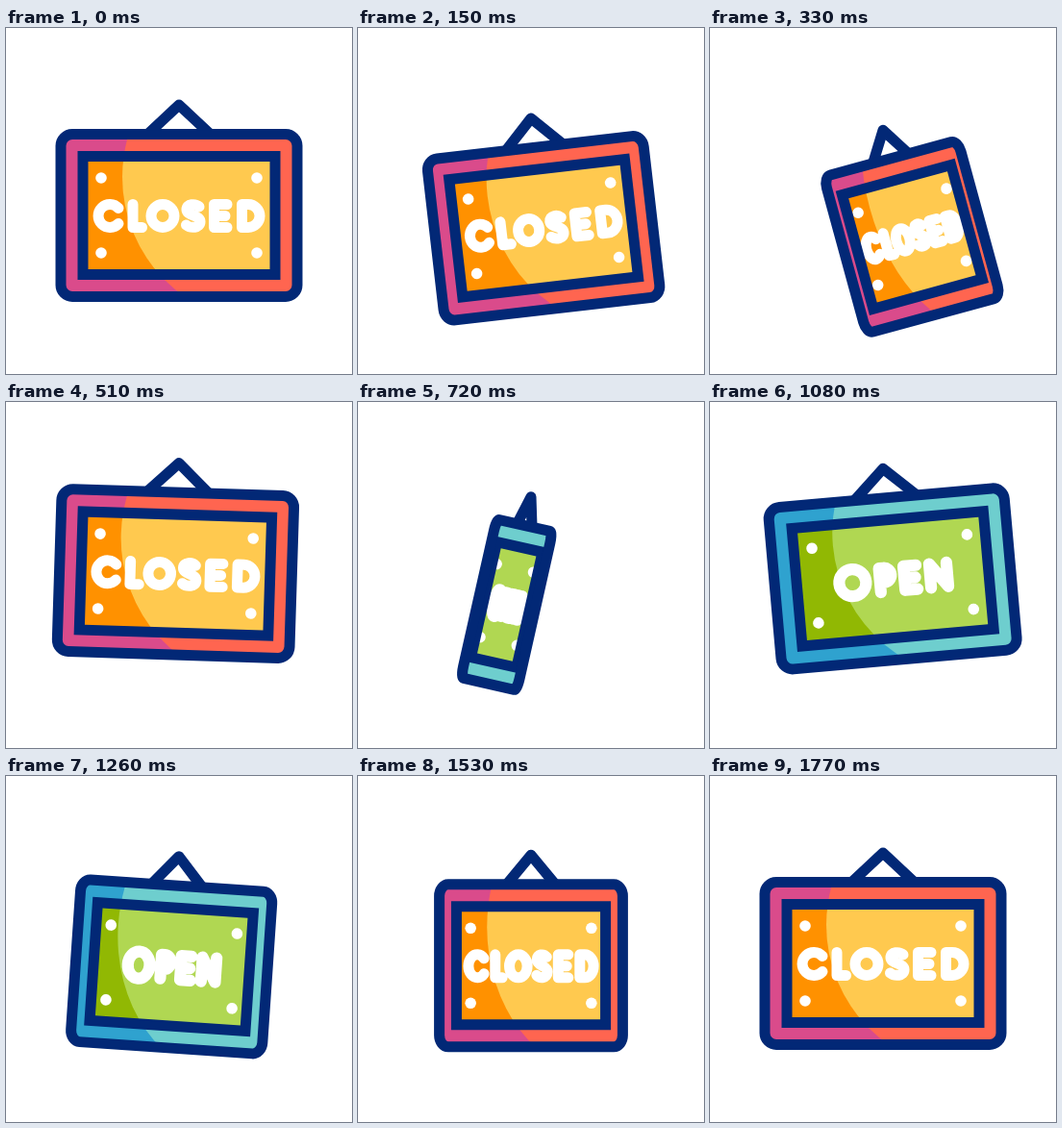
An HTML page with a canvas for the animation above (1.8 s loop, 360 by 360 pixels).

```html
<!DOCTYPE html>
<html lang="en">
<head>
<meta charset="utf-8">
<title>Closed / Open sign</title>
<style>
  html, body { margin: 0; width: 100%; height: 100%; overflow: hidden; background: #fff; }
  canvas { display: block; width: 360px; height: 360px; }
</style>
</head>
<body>
<canvas id="stage" role="img" aria-label="Hanging sign turning between CLOSED and OPEN"></canvas>
<script>
const LOOP = 1800, STEP = 30;
const PIVOT = { x: 180, y: 80 };
const NAVY = '#022876';

// Keys are [ms, value], joined with a sine ease.
const SWING = [[0, 0], [330, -15.3], [660, 14.6], [980, -8], [1285, 4.1], [1530, 0], [LOOP, 0]];
const DROP = [[0, 0], [300, 28], [555, -20], [800, 31], [1055, -11], [1340, 7], [1650, 0], [LOOP, 0]];
const TURN = [[0, 0], [330, -54], [965, 180], [1060, 180], [1740, 360], [LOOP, 360]];

const SIDES = {
  closed: {
    frame: ['#da4b8b', '#ff6550'],
    face: ['#ff9100', '#ffc94f'],
    weight: 11,
    slide: 0,
    letters: new Path2D(
      'M-63,-8A12,12 0 1 0 -63,8' +
      'M-48,-12V12H-38.5' +
      'M-29,0A12,12 0 1 1 -5,0A12,12 0 1 1 -29,0Z' +
      'M21,-9.5C17,-13 8,-13 8,-6.5C8,0 22,-1 22,6C22,13 12,13 7.5,9.5' +
      'M50,-12H36.5V12H50M36.5,0H48' +
      'M65.5,-12V12H72A12,12 0 0 0 72,-12Z')
  },
  open: {
    frame: ['#2fa2cf', '#6ecece'],
    face: ['#91b803', '#b0d752'],
    weight: 12.2,
    slide: 55,
    letters: new Path2D(
      'M-56,0A14,14 0 1 1 -28,0A14,14 0 1 1 -56,0Z' +
      'M-13.5,12.5V-12.5H-9A7.5,7.5 0 0 1 -9,2.5H-13.5' +
      'M25,-12.5H12V12.5H25M12,0H23.5' +
      'M39,12.5V-12.5L57,12.5V-12.5')
  }
};

const OUTLINE = new Path2D();
OUTLINE.roundRect(-123, 30.5, 246, 169, 12);
const FACE = new Path2D('M-100,53.5H100V176.5H-100Z');
const HOOK = new Path2D('M-31,29L0,0L31,29');
const LIGHT = new Path2D('M93,-77A152,152 0 0 0 93,227H600V-77Z');

const canvas = document.getElementById('stage');
const ctx = canvas.getContext('2d');
const dpr = window.devicePixelRatio || 1;
canvas.width = canvas.height = 360 * dpr;

function valueAt(keys, t) {
  const i = Math.max(1, keys.findIndex(k => k[0] > t));
  const [t0, a] = keys[i - 1], [t1, b] = keys[i];
  return a + (b - a) * (1 - Math.cos(Math.PI * (t - t0) / (t1 - t0))) / 2;
}

// Narrows a shape but leaves its line weight to the caller.
function narrow(path, s, x = 0, y = 0) {
  const p = new Path2D();
  p.addPath(path, new DOMMatrix([s, 0, 0, 1, x, y]));
  return p;
}

function line(path, color, width, join = 'round') {
  ctx.strokeStyle = color;
  ctx.lineWidth = width;
  ctx.lineJoin = join;
  ctx.stroke(path);
}

function shaded(shape, light, [dark, bright]) {
  ctx.save();
  ctx.clip(shape);
  ctx.fillStyle = dark;
  ctx.fill(shape);
  ctx.fillStyle = bright;
  ctx.fill(light);
  ctx.restore();
}

function drawSign(side, s) {
  const outline = narrow(OUTLINE, s);
  const face = narrow(FACE, s);
  const light = narrow(LIGHT, s, -side.slide * (1 - s));

  line(narrow(HOOK, s), NAVY, 11);
  shaded(outline, light, side.frame);
  shaded(face, light, side.face);

  ctx.fillStyle = '#fff';
  for (const x of [-81, 81]) {
    for (const y of [76, 154]) {
      ctx.beginPath();
      ctx.arc(x * s, y, 5.8, 0, Math.PI * 2);
      ctx.fill();
    }
  }
  line(narrow(side.letters, s, 0, 115.5), '#fff', side.weight);
  line(face, NAVY, 11, 'miter');
  line(outline, NAVY, 11);
}

function draw(t) {
  const facing = Math.cos(valueAt(TURN, t) * Math.PI / 180);
  ctx.setTransform(dpr, 0, 0, dpr, 0, 0);
  ctx.fillStyle = '#fff';
  ctx.fillRect(0, 0, 360, 360);
  ctx.lineCap = 'round';
  ctx.translate(PIVOT.x, PIVOT.y + valueAt(DROP, t));
  ctx.rotate(valueAt(SWING, t) * Math.PI / 180);
  drawSign(facing > 0 ? SIDES.closed : SIDES.open, Math.max(0.01, Math.abs(facing)));
}

const start = performance.now();
function tick() {
  const t = (performance.now() - start) % LOOP;
  draw(Math.floor(t / STEP) * STEP);
  requestAnimationFrame(tick);
}
tick();
</script>
</body>
</html>
```
